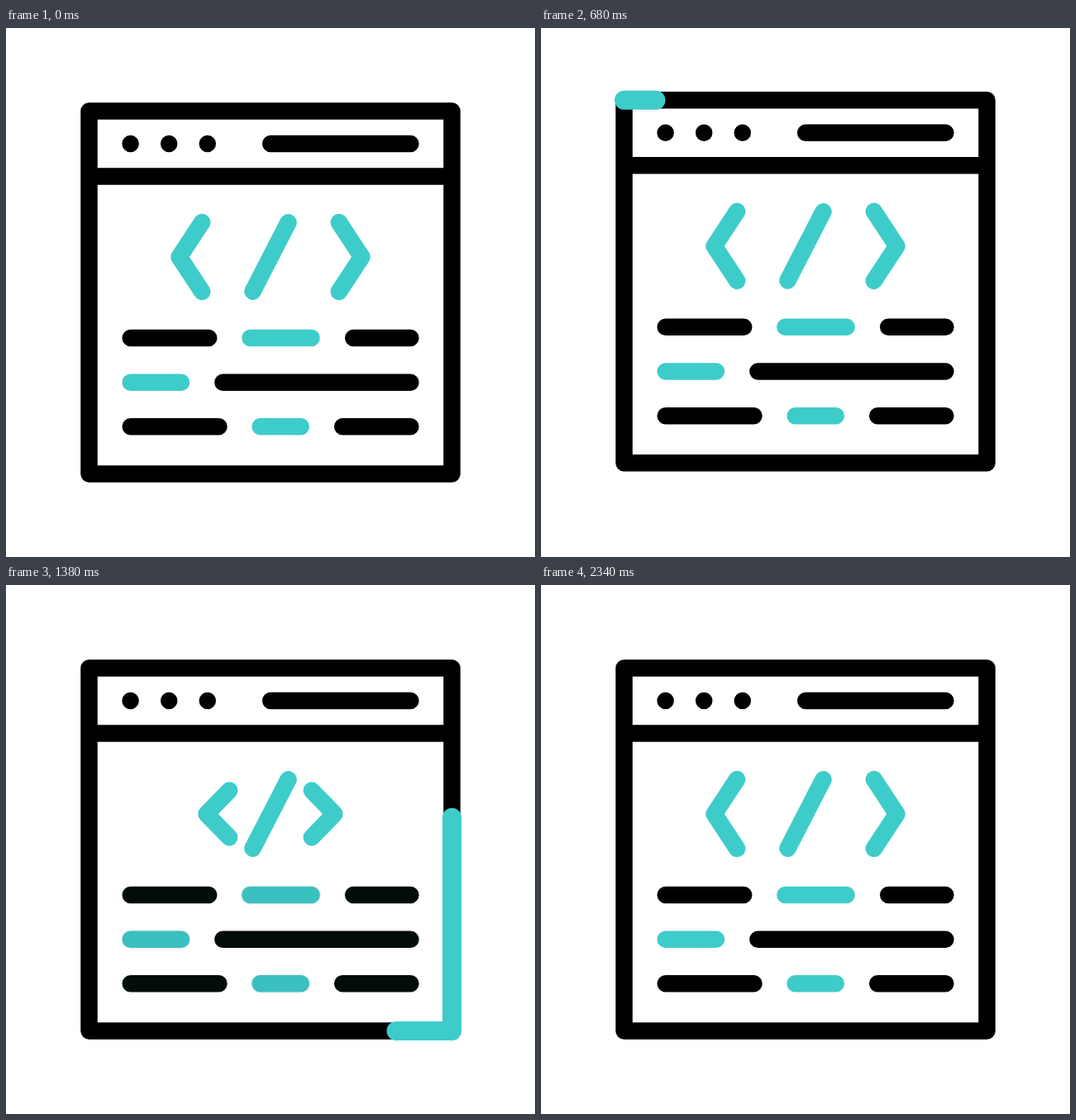
Animation of 640 by 640 pixels, one loop 2400 ms. Source, as an HTML page:

```html
<!DOCTYPE html>
<html>
<head>
<meta charset="utf-8">
<title>Code window</title>
<style>
  html, body { margin: 0; height: 100%; overflow: hidden; background: #fff; }
  svg { display: block; width: 100vw; height: 100vh; }
  path { fill: none; stroke: #000; stroke-width: 20.5; stroke-linecap: round; stroke-linejoin: round; }
  .teal { stroke: #3ecccb; }
  .thick { stroke-width: 23; }
</style>
</head>
<body>
<svg viewBox="0 0 640 640">
  <g id="win">
    <path d="M100.5 100.5H539.5V539.5H100.5ZM100.5 179.5H539.5"/>
    <path d="M150.6 140h.01M197.2 140h.01M243.8 140h.01M320.2 140H489.4"/>
    <path class="teal" d="M341.5 235.3L298.5 318.7"/>
    <path class="teal" id="brackets"/>
    <path class="dark"/>
    <path class="teal lit"/>
    <g id="swap">
      <path class="teal thick dark"/>
      <path class="thick lit"/>
    </g>
    <path class="teal thick" id="runner"/>
  </g>
</svg>
<script>
const LOOP = 2400, LEFT = 100.5, SIDE = 439;
const $ = id => document.getElementById(id);
const ease = (t, from, to) => {
  const u = Math.min(1, Math.max(0, (t - from) / (to - from)));
  return u * u * (3 - 2 * u);
};
// Rises from 0 to 1 and falls back
const pulse = (t, from, peak, to) => t < peak ? ease(t, from, peak) : 1 - ease(t, peak, to);

// Text rows: [y, start, end]
const dark = [[375, 150.7, 245.2], [375, 420.2, 489.4], [428.7, 262.4, 489.4],
              [482.3, 150.7, 257.5], [482.3, 407.2, 489.4]];
const lit = [[375, 295.4, 369.6], [428.7, 150.7, 212], [482.3, 307.6, 356.8]];
const setRows = (cls, rows) => {
  const d = rows.map(([y, a, b]) => `M${a} ${y}H${b}`).join('');
  document.querySelectorAll(cls).forEach(p => p.setAttribute('d', d));
};
setRows('.dark', dark);
setRows('.lit', lit);

// Point at distance s along the frame, clockwise from its top left corner
function framePoint(s) {
  const side = Math.min(3, Math.floor(s / SIDE)), k = s - side * SIDE;
  const [x, y] = [[k, 0], [SIDE, k], [SIDE - k, SIDE], [0, SIDE - k]][side];
  return `${LEFT + x} ${LEFT + y}`;
}

function runnerPath(tail, head) {
  if (head - tail < 0.01) return '';
  const stops = [tail];
  for (let i = 1; i < 4; i++)
    if (i * SIDE > tail && i * SIDE < head) stops.push(i * SIDE);
  return 'M' + [...stops, head].map(framePoint).join('L');
}

function bracketsPath(squeeze) {
  const dx = 35 * squeeze, h = 42 - 14.4 * squeeze;
  const bracket = (end, tip) => `M${end} ${277 - h}L${tip} 277L${end} ${277 + h}`;
  return bracket(237.2 + dx, 209.6 + dx) + bracket(402.8 - dx, 430.4 - dx);
}

function draw(now) {
  const t = now % LOOP;
  const hop = pulse(t, 207, 395, 576) + pulse(t, 576, 800, 1023);
  $('win').setAttribute('transform', `translate(0 ${-29 * hop})`);
  $('brackets').setAttribute('d', bracketsPath(pulse(t, 1035, 1440, 1845)));
  $('swap').setAttribute('opacity', pulse(t, 1024, 1216, 1408) + pulse(t, 1408, 1600, 1792));
  $('runner').setAttribute('d',
    runnerPath(4 * SIDE * ease(t, 740, 2340), 4 * SIDE * ease(t, 540, 2140)));
}

const start = performance.now();
const tick = () => {
  draw(performance.now() - start);
  requestAnimationFrame(tick);
};
tick();
</script>
</body>
</html>
```
